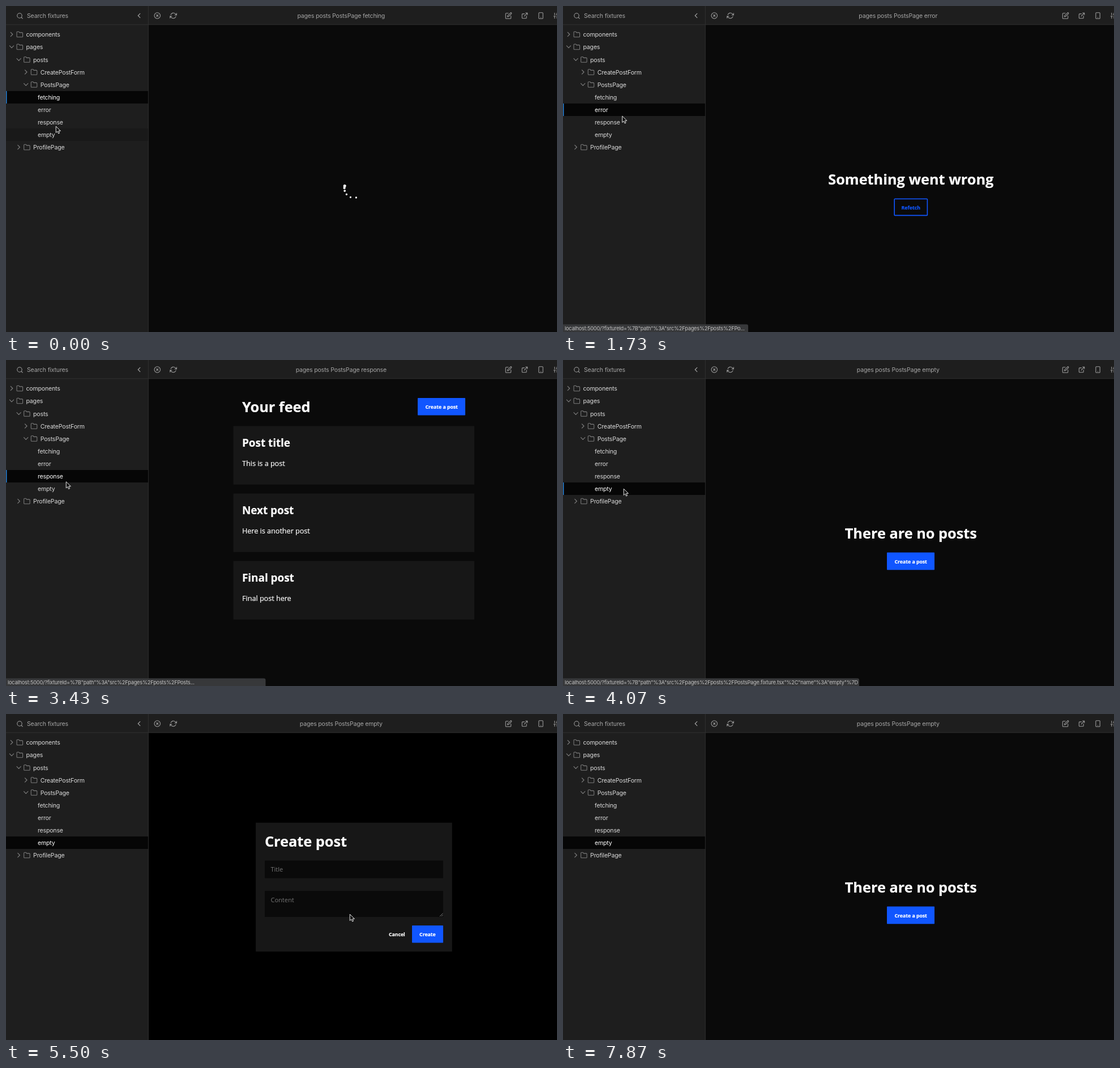
An HTML page that plays this animation: 973x575 px, repeating every 8.66 s.

```html
<!DOCTYPE html>
<html lang="en">
<head>
<meta charset="utf-8">
<title>Fixture browser</title>
<style>
  html, body { margin: 0; width: 100%; height: 100%; overflow: hidden; background: #0a0a0a; }
  svg { display: block; width: 100vw; height: 100vh; }
  .ui { font: 10.5px Inter, sans-serif; letter-spacing: -.16px; fill: #dadada; }
  .dim { fill: #a6a6a6; }
  .mid { text-anchor: middle; }
  .status { font: 9.2px Inter, sans-serif; letter-spacing: -.19px; fill: #c4c4c4; }
  .icon { fill: none; stroke: #a0a0a0; stroke-width: 2; stroke-linecap: round; stroke-linejoin: round; }
  .faint .icon { stroke: #7c7c7c; }
  .page { font: 12.6px "Open Sans", sans-serif; fill: #fff; }
  .page text { stroke: #fff; stroke-width: .2px; }
  .h1 { font-size: 25.3px; font-weight: 700; }
  .h2 { font-size: 18.86px; font-weight: 700; }
  .btn { font-size: 8.7px; font-weight: 700; text-anchor: middle; }
  .page .hint { font-size: 11px; fill: #757575; stroke: none; }
  .blue { fill: #1056ff; }
  .page text.blue { stroke: #1056ff; }
  .card { fill: #171717; }
</style>
</head>
<body>
<svg viewBox="0 0 973 575" id="stage"></svg>
<script>
const LOOP = 8660;
const CLICK = { error: 1250, response: 2570, empty: 3800, blur: 5400, open: 5470, close: 7130 };
const FIXTURES = ['fetching', 'error', 'response', 'empty'];
const ROW_TOP = 150, ROW = 22;

const ICONS = {
  folder: 'M22 19a2 2 0 0 1-2 2H4a2 2 0 0 1-2-2V5a2 2 0 0 1 2-2h5l2 3h9a2 2 0 0 1 2 2z',
  right: 'M9 18l6-6-6-6',
  down: 'M6 9l6 6 6-6',
  left: 'M15 18l-6-6 6-6',
  search: 'M3 11a8 8 0 1 0 16 0a8 8 0 1 0-16 0M21 21l-4.35-4.35',
  close: 'M2 12a10 10 0 1 0 20 0a10 10 0 1 0-20 0M15 9l-6 6M9 9l6 6',
  refresh: 'M23 4v6h-6M1 20v-6h6M3.5 9a9 9 0 0 1 14.9-3.4L23 10M1 14l4.6 4.4A9 9 0 0 0 20.5 15',
  edit: 'M11 4H4a2 2 0 0 0-2 2v14a2 2 0 0 0 2 2h14a2 2 0 0 0 2-2v-7M18.5 2.5a2.1 2.1 0 0 1 3 3L12 15l-4 1 1-4z',
  open: 'M18 13v6a2 2 0 0 1-2 2H5a2 2 0 0 1-2-2V8a2 2 0 0 1 2-2h6M15 3h6v6M10 14L21 3',
  phone: 'M7 2h10a2 2 0 0 1 2 2v16a2 2 0 0 1-2 2H7a2 2 0 0 1-2-2V4a2 2 0 0 1 2-2zM12 18h.01',
  sliders: 'M4 21v-7M4 10V3M12 21v-9M12 8V3M20 21v-5M20 12V3M1 14h6M9 8h6M17 16h6'
};

const icon = (name, x, y, s = .524) =>
  `<path class="icon" d="${ICONS[name]}" transform="translate(${x - 12 * s} ${y - 12 * s}) scale(${s})"/>`;
const rect = (x, y, w, h, attrs) => `<rect x="${x}" y="${y}" width="${w}" height="${h}" ${attrs}/>`;
const text = (s, x, y, cls = '', id = '') => `<text x="${x}" y="${y}" class="${cls}" id="${id}">${s}</text>`;

const folder = ([label, level, y, open]) => {
  const dx = level * 12.6;
  return icon(open ? 'down' : 'right', 10 + dx, y, .6) + icon('folder', 24.3 + dx, y) +
    text(label, 35.5 + dx, y + 4, 'ui');
};
const folders = [['components', 0, 50], ['pages', 0, 72, 1], ['posts', 1, 94.5, 1],
  ['CreatePostForm', 2, 116.5], ['PostsPage', 2, 138.5, 1], ['ProfilePage', 1, 249]];
const posts = [['Post title', 'This is a post'], ['Next post', 'Here is another post'], ['Final post', 'Final post here']];

const pages = {
  fetching: '<circle r="3.93"/>'.repeat(6),
  error: text('Something went wrong', 614.3, 315.4, 'h1 mid') +
    rect(585.2, 340.2, 58.2, 29.2, 'fill="none" stroke="#1056ff" stroke-width="1.6" rx="1"') +
    text('Refetch', 614.2, 358.6, 'btn blue'),
  response: text('Your feed', 417, 92.2, 'h1') + rect(727, 67, 84, 30.6, 'class="blue" rx=".8"') +
    text('Create a post', 769.2, 86, 'btn') +
    posts.map(([title, body], i) => `<g transform="translate(0 ${i * 119})">` +
      rect(401.5, 116.5, 425.5, 103.2, 'class="card"') +
      text(title, 417, 152.5, 'h2') + text(body, 417, 187.2) + '</g>').join(''),
  empty: text('There are no posts', 614.3, 315.4, 'h1 mid') +
    rect(572, 339.6, 84, 30.6, 'class="blue" rx=".8" id="add"') + text('Create a post', 614.2, 358.6, 'btn'),
  modal: rect(252, 33.5, 721, 542, 'fill="#000"') + rect(441, 191.7, 346.7, 227.3, 'class="card"') +
    text('Create post', 457, 233.9, 'h1') +
    rect(457, 258.5, 315, 31, 'fill="#0a0a0a"') + text('Title', 467.5, 278, 'hint') +
    rect(457, 312, 315, 46, 'fill="#0a0a0a"') + text('Content', 467.5, 331.7, 'hint') +
    '<path d="M766 357l5.5-5.5M769 357l2.5-2.5" stroke="#999" stroke-width=".8"/>' +
    text('Cancel', 690.3, 391.7, 'btn') + rect(717, 373, 55, 30.6, 'class="blue" rx=".8"') +
    text('Create', 744.4, 391.7, 'btn')
};

document.getElementById('stage').innerHTML =
  rect(0, 0, 973, 575, 'fill="#0a0a0a"') +
  rect(0, 0, 973, 33, 'fill="#1e1e1e"') + rect(0, 0, 251, 575, 'fill="#1e1e1e"') +
  Object.entries(pages).map(([id, body]) => `<g class="page" id="${id}">${body}</g>`).join('') +
  rect(0, 32.4, 973, .9, 'fill="#333"') + rect(250.8, 0, .9, 575, 'fill="#333"') +
  icon('search', 24.5, 17.5) + text('Search fixtures', 37, 21, 'ui dim') + icon('left', 235, 17, .6) +
  icon('close', 267.2, 17) + icon('refresh', 295.5, 17) + text('', 591.8, 20.5, 'ui dim mid', 'title') +
  ['edit', 'open', 'phone', 'sliders'].map((n, i) => icon(n, 887.5 + i * 28.5, 17)).join('') +
  rect(0, 0, 250.8, ROW, 'fill="#191919" id="hover"') +
  rect(0, 0, 250.8, ROW, 'fill="#060606" id="row"') + rect(0, 0, 1.4, ROW, 'fill="#2686e0" id="marker"') +
  '<g class="faint">' + folders.map(folder).join('') + '</g>' +
  FIXTURES.map((name, i) => text(name, 56, ROW_TOP + i * ROW + 14.8, 'ui', 'item' + i)).join('') +
  '<g id="status"><path id="bar" fill="#37383a"/>' + text('', 3, 572.2, 'status', 'link') + '</g>' +
  `<g id="cursor" stroke-linejoin="round">
    <path id="arrow" d="M.2 1.2V12.4l2.6-2.4 1.8 4 1.9-.9-1.7-3.8h3.6z" fill="#111" stroke="#fff" stroke-width=".9"/>
    <path id="hand" d="M-1 0q1-.9 1.9 0l.6 4q1-.6 1.6.3 1-.5 1.6.5 1.3-.3 1.4 1.2v2.6l-1 3.4h-5.4l-2.8-3.7q-.7-1.5 1-1l1.3 1z"
      fill="#fff" stroke="#111" stroke-width=".9"/>
  </g>`;

const $ = id => document.getElementById(id);
const show = (id, on) => $(id).setAttribute('visibility', on ? 'visible' : 'hidden');
const clamp = (v, a = 0, b = 1) => Math.min(b, Math.max(a, v));
const ramp = (t, from, to) => clamp((t - from) / (to - from));

// CSS ease-in-out, cubic-bezier(.42, 0, .58, 1)
function ease(x) {
  let lo = 0, hi = 1;
  for (let i = 0; i < 22; i++) {
    const s = (lo + hi) / 2, r = 1 - s;
    if (3 * s * r * r * .42 + 3 * s * s * r * .58 + s ** 3 < x) lo = s; else hi = s;
  }
  return lo * lo * (3 - 2 * lo);
}

// Pointer stops: time, x, y
const PATH = [[-120, 87, 224], [0, 88, 211], [700, 103.3, 184], [1600, 103.3, 184], [1730, 104.5, 193],
  [2050, 105.5, 213], [3230, 105.5, 213], [3430, 106, 213.5], [3720, 107, 226], [4600, 107, 226],
  [5000, 607, 352], [5700, 607, 352], [6370, 308.6, 329], [7250, 308.6, 329], [7840, 291, 27]];

function pointer(t) {
  const n = PATH.findIndex(p => p[0] > t);
  if (n < 0) return PATH[PATH.length - 1].slice(1);
  if (n === 0) return PATH[0].slice(1);
  const a = PATH[n - 1], b = PATH[n], k = ease(ramp(t, a[0], b[0]));
  return [a[1] + (b[1] - a[1]) * k, a[2] + (b[2] - a[2]) * k];
}

function drawSpinner(t) {
  const T = t / 1000 + 2.34;
  [...$('fetching').children].forEach((dot, i) => {
    const u = (T + 1.1 - i * .1) % 2;
    const turn = T / 2.5 + ease(clamp(u / 1.6));
    const size = u < 1 ? 1 - .6 * ease(u) : .4 + .6 * ease(u - 1);
    dot.setAttribute('transform', `translate(614.2 321.7) rotate(${turn * 360 - 135}) translate(16.67) scale(${size})`);
  });
}

function drawStatus(t, over) {
  const link = 'localhost:5000/?fixtureId=%7B"path"%3A"src%2Fpages%2Fposts%2FPosts';
  const full = name => `${link}Page.fixture.tsx"%2C"name"%3A"${name}"%7D`;
  const grow = ramp(t, 3358, 3478);
  const onEmpty = t > 3500 && (over === 3 || t > 4500);
  const w = onEmpty ? 523 : 327 + 216 * grow;
  $('bar').setAttribute('d', `M0 561.5H${w - 3}q3 0 3 3V575H0z`);
  $('link').textContent = onEmpty ? full('empty') : grow === 1 ? full('response') :
    grow > 0 ? link + '...' : link.slice(0, -3) + '...';
  $('status').setAttribute('opacity', ramp(t, 100, 220) * (1 - ramp(t, 4990, 5190)));
}

function draw(t) {
  const sel = t < CLICK.error ? 0 : t < CLICK.response ? 1 : t < CLICK.empty ? 2 : 3;
  const [x, y] = pointer(t), [hx, hy] = pointer(t - 60);
  const over = hx < 251 ? Math.floor((hy - ROW_TOP) / ROW) : -1;
  const modal = t >= CLICK.open && t < CLICK.close;
  const onButton = !modal && sel === 3 && x > 572 && x < 656 && y > 339 && y < 371;

  FIXTURES.forEach((name, i) => {
    show(name, i === sel);
    $('item' + i).style.fill = i === sel ? '#fff' : '';
  });
  show('modal', modal);
  $('title').textContent = 'pages posts PostsPage ' + FIXTURES[sel];
  $('row').setAttribute('y', ROW_TOP + sel * ROW);
  $('marker').setAttribute('y', ROW_TOP + sel * ROW);
  show('marker', t < CLICK.blur);
  $('hover').setAttribute('y', ROW_TOP + over * ROW);
  show('hover', over >= 0 && over < 4);
  $('add').style.fill = onButton ? '#2063ff' : '';

  $('cursor').setAttribute('transform', `translate(${x} ${y})`);
  show('arrow', !onButton && t < 7850);
  show('hand', onButton);
  drawStatus(t, over);
  if (sel === 0) drawSpinner(t);
}

const start = performance.now();
function tick() {
  draw((performance.now() - start) % LOOP);
  requestAnimationFrame(tick);
}
tick();
</script>
</body>
</html>
```
